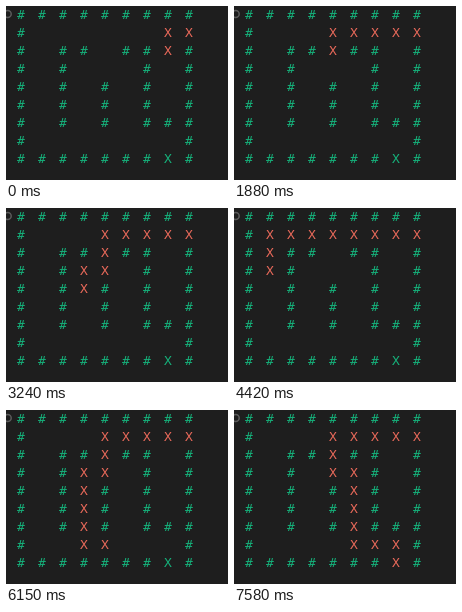
An HTML page that plays this animation: 222 px wide and 174 px high, repeating every 8550 ms.

```html
<!DOCTYPE html>
<html lang="en">
<head>
<meta charset="utf-8">
<title>Maze search</title>
<style>
html, body { margin: 0; width: 100%; height: 100%; overflow: hidden; background: #1e1e1e; }
svg { display: block; width: 100vw; height: 100vh; }
text { font: 13px "DejaVu Sans Mono", "Noto Sans Mono", monospace; text-anchor: middle; }
</style>
</head>
<body>
<svg id="stage" viewBox="0 0 222 174" xmlns="http://www.w3.org/2000/svg">
  <rect width="222" height="174" fill="#1e1e1e"/>
  <circle cx="1.7" cy="8" r="3.5" fill="none" stroke="#5c5c5c" stroke-width="1.5"/>
</svg>
<script>
const GREEN = '#16b07a', RED = '#e8695a';
const LOOP = 8550;
const MAZE = [
  '#########',
  '#       O',
  '# ## ## #',
  '# #   # #',
  '# # # # #',
  '# # # # #',
  '# # # ###',
  '#       #',
  '#######X#'
];
const START = [1, 8];

// [search step, time in ms]; steps in between are evenly spaced
const PACE = [[3, 0], [4, 180], [6, 610], [8, 1060], [11, 1670], [12, 1910], [14, 2330],
  [15, 2580], [19, 3420], [20, 3700], [24, 4550], [28, 5450], [32, 6270], [36, 7120]];

const key = (r, c) => r + ',' + c;

// Breadth-first search; returns the path taken at every step
function search() {
  const queue = [[START]], seen = new Set(), steps = [];
  while (queue.length) {
    const path = queue.shift();
    const [r, c] = path[path.length - 1];
    steps.push(path);
    if (MAZE[r][c] === 'X') break;
    for (const [dr, dc] of [[-1, 0], [1, 0], [0, -1], [0, 1]]) {
      const y = r + dr, x = c + dc, id = key(y, x);
      const cell = MAZE[y] && MAZE[y][x];
      if (!cell || cell === '#' || seen.has(id)) continue;
      seen.add(id);
      queue.push([...path, [y, x]]);
    }
  }
  return steps.map(path => new Set(path.map(p => key(...p))));
}

function stepAt(t) {
  for (let i = 1; i < PACE.length; i++) {
    const [n0, t0] = PACE[i - 1], [n1, t1] = PACE[i];
    if (t < t1) return Math.floor(n0 + (n1 - n0) * (t - t0) / (t1 - t0) + 1e-6);
  }
  return PACE[PACE.length - 1][0];
}

const stage = document.getElementById('stage');
const cells = [];
MAZE.forEach((row, r) => [...row].forEach((char, c) => {
  const el = document.createElementNS(stage.namespaceURI, 'text');
  el.setAttribute('x', 14.8 + 21 * c);
  el.setAttribute('y', 13 + 18.05 * r);
  stage.appendChild(el);
  cells.push({ el, id: key(r, c), char: char === 'O' ? ' ' : char });
}));

const steps = search();
let shown = -1;

function draw(t) {
  const n = stepAt(t);
  if (n === shown) return;
  shown = n;
  const path = steps[n - 1];
  for (const { el, id, char } of cells) {
    const on = path.has(id);
    el.textContent = on ? 'X' : char;
    el.setAttribute('fill', on ? RED : GREEN);
  }
}

const begin = performance.now();
function tick() {
  draw((performance.now() - begin) % LOOP);
  requestAnimationFrame(tick);
}
tick();
</script>
</body>
</html>
```
